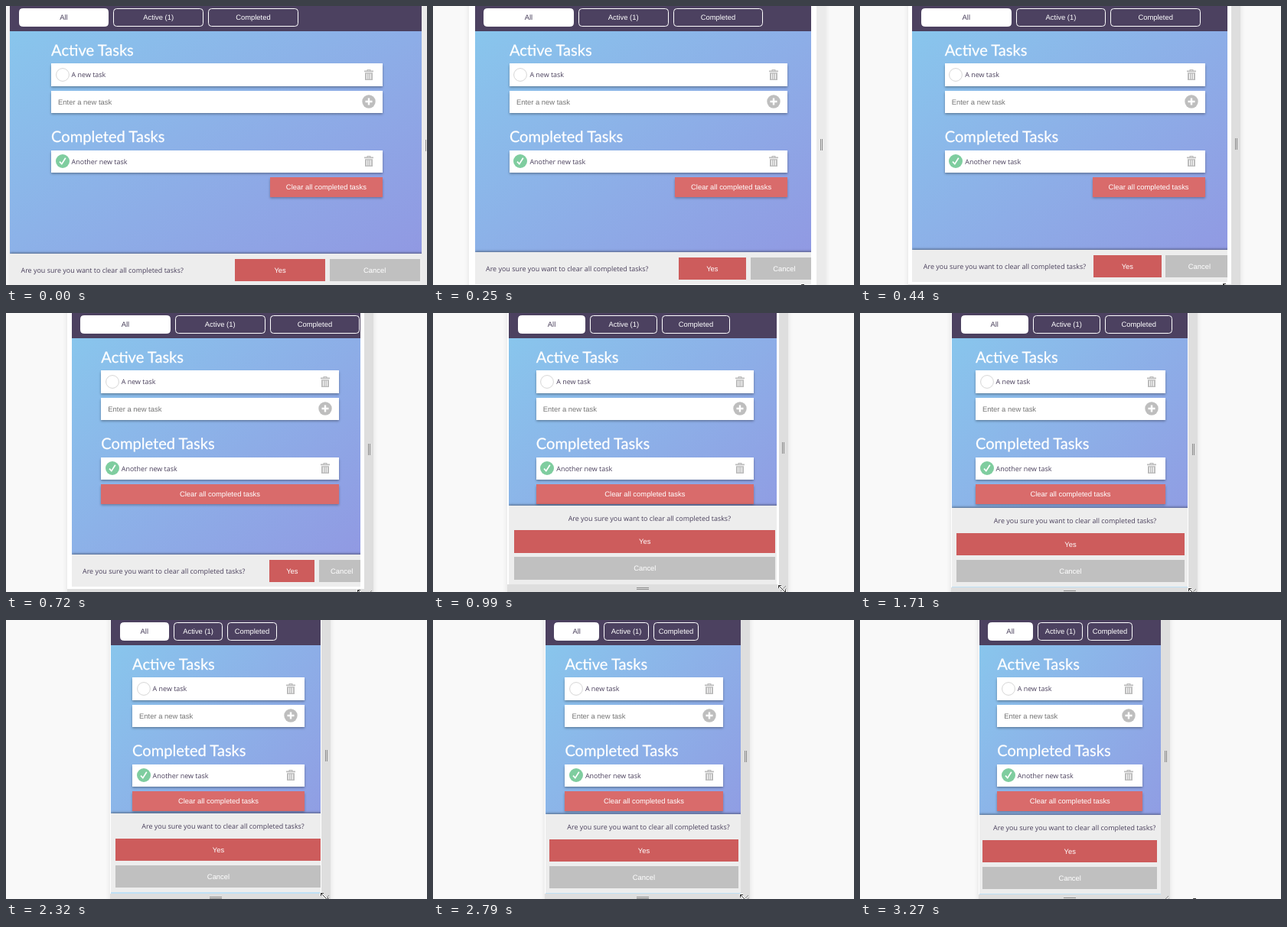
An HTML page for the animation above (3.3 s loop, 550 by 365 pixels).

```html
<!DOCTYPE html>
<html lang="en">
<head>
<meta charset="utf-8">
<title>Responsive task list</title>
<style>
  html, body { margin: 0; width: 100%; height: 100%; overflow: hidden; background: #f9f9f9; }
  #stage {
    position: relative; width: 550px; height: 365px; overflow: hidden; background: #f9f9f9;
    font: 9.42px "Liberation Sans", Arial, sans-serif; text-rendering: geometricPrecision;
    --ink: #4a405c; --cut: calc(548px - 2 * var(--outer));
  }
  #stage div, #stage svg { position: absolute; box-sizing: border-box; white-space: nowrap; }

  /* device frame with its drag bars */
  .frame {
    left: var(--outer); top: -20px; width: calc(var(--cut) + 12px); height: calc(var(--foot) + 32px);
    background: var(--bar); box-shadow: 0 0 7px rgba(0, 0, 0, .1);
  }
  .paper { left: var(--outer); top: 0; width: var(--cut); height: var(--foot); background: #fff; }
  .grip { border: solid #8b8b8b; }
  .grip.side {
    left: calc(552.5px - var(--outer)); top: calc(var(--bottom) / 2 - 8px);
    width: 3px; height: 15px; border-width: 0 1px;
  }
  .grip.base { left: 266px; top: calc(var(--foot) + 4px); width: 16px; height: 3px; border-width: 1px 0; }
  .corner { left: calc(549.5px - var(--outer)); top: calc(var(--foot) + 1px); width: 9px; height: 9px; }
  .cursor { left: calc(var(--cx) - 6px); top: calc(var(--cy) - 6px); width: 12px; height: 12px; }

  /* page: the layout width trails behind the clipped width */
  .page {
    left: var(--left); top: 0; width: calc(548.2px - 2 * var(--left)); height: var(--foot); overflow: hidden;
  }
  .gap { left: 0; top: 300px; width: 100%; bottom: 0; background: var(--gap); }
  .view { left: 0; top: 0; width: var(--width); height: var(--bottom); overflow: hidden; }
  .sky { inset: 0 0 20px 0; background: linear-gradient(to bottom right, #88c8ed, #9197e2); }
  .head { left: 0; top: 0; width: 100%; height: 32.5px; background: #4c4160; }
  .tab {
    top: 3px; left: calc(11.6px + var(--i) * (var(--tab) + 5.9px)); width: var(--tab); height: 24px;
    border: 1px solid #fff; border-radius: 4.5px; color: #fff; line-height: 22px; text-align: center;
  }
  .tab.on { background: #fff; color: var(--ink); }
  .body { left: 10%; top: 0; width: 80%; height: 100%; }
  .title {
    left: 0; height: 24px; line-height: 24px; color: #fff;
    font-family: Lato, sans-serif; font-size: 20.1px; -webkit-text-stroke: .25px #fff;
  }
  .card {
    left: 0; width: 100%; height: 29.5px; line-height: 29.5px;
    background: #fff; box-shadow: 0 1.5px 3px rgba(0, 0, 0, .35);
  }
  .task, .ask { font-family: "Open Sans", "Noto Sans", sans-serif; font-size: 8.95px; color: var(--ink); }
  .task { left: 26.5px; top: 0; }
  .hint { left: 9px; top: 0; color: #757575; }
  .dot { left: 5.5px; top: 5.5px; width: 18px; height: 18px; }
  .icon { right: 9px; top: 5.5px; width: 18px; height: 18px; }
  .clear {
    right: 0; top: 224px; width: var(--clear); height: 26.3px; line-height: 26.3px;
    background: #d96b6b; color: #fff; text-align: center; box-shadow: 0 1.5px 3px rgba(0, 0, 0, .3);
  }

  .dialog {
    left: 0; bottom: 0; width: 100%; height: 42.5px; background: #ededed;
    box-shadow: 0 -1px 3px rgba(0, 0, 0, .45);
  }
  .ask { left: 14.5px; bottom: 10px; height: 20px; line-height: 20px; }
  .btn {
    bottom: 6px; width: var(--btn); height: 29.3px; line-height: 29.3px; color: #fff; text-align: center;
  }
  .yes { right: calc(11.2px + var(--btn)); background: #cd5c5c; }
  .no { right: 5.4px; background: #c0c0c0; }
  .stacked .dialog { height: 103px; }
  .stacked .ask { left: 6px; width: 100%; bottom: 76px; text-align: center; }
  .stacked .btn { left: 2%; width: 96%; right: auto; }
  .stacked .yes { bottom: 41px; }
</style>
</head>
<body>
<svg width="0" height="0" style="position:absolute">
  <symbol id="open" viewBox="0 0 18 18"><circle cx="9" cy="9" r="8.4" fill="#fff" stroke="#d6d6d6"/></symbol>
  <symbol id="done" viewBox="0 0 18 18">
    <circle cx="9" cy="9" r="9" fill="#7fcd9f"/>
    <path d="M5 9.6 7.8 12.6 12.8 4.8" fill="none" stroke="#fff" stroke-width="1.7"/>
  </symbol>
  <symbol id="bin" viewBox="0 0 18 18">
    <path d="M3 3.6h12v1.7H3zM6.5 2h5v1.6h-1.2v-.5H7.7v.5H6.500z M4 6.200h10V16H4z" fill="#bcbcbc"/>
    <path d="M6.500 7.600v7M9 7.600v7M11.500 7.600v7" stroke="#fff"/>
  </symbol>
  <symbol id="plus" viewBox="0 0 18 18">
    <circle cx="9" cy="9" r="8.700" fill="#bebebe"/>
    <path d="M9 4.500v9M4.500 9h9" stroke="#fff" stroke-width="2.400"/>
  </symbol>
</svg>

<div id="stage">
  <div class="frame"></div>
  <div class="paper"></div>
  <div class="page">
    <div class="gap"></div>
    <div class="view">
      <div class="sky"></div>
      <div class="head">
        <div class="tab on" style="--i:0">All</div>
        <div class="tab" style="--i:1">Active (1)</div>
        <div class="tab" style="--i:2">Completed</div>
      </div>
      <div class="body">
        <div class="title" style="top:46px">Active Tasks</div>
        <div class="card" style="top:75px">
          <svg class="dot"><use href="#open"/></svg>
          <div class="task">A new task</div>
          <svg class="icon"><use href="#bin"/></svg>
        </div>
        <div class="card" style="top:110.500px">
          <div class="hint">Enter a new task</div>
          <svg class="icon"><use href="#plus"/></svg>
        </div>
        <div class="title" style="top:159.200px">Completed Tasks</div>
        <div class="card" style="top:188.500px">
          <svg class="dot"><use href="#done"/></svg>
          <div class="task">Another new task</div>
          <svg class="icon"><use href="#bin"/></svg>
        </div>
        <div class="clear">Clear all completed tasks</div>
      </div>
      <div class="dialog">
        <div class="ask">Are you sure you want to clear all completed tasks?</div>
        <div class="btn yes">Yes</div>
        <div class="btn no">Cancel</div>
      </div>
    </div>
  </div>
  <div class="grip side"></div>
  <div class="grip base"></div>
  <svg class="corner" viewBox="0 0 9 9"><path d="M1 8 8 1M4.500 8.500 8.500 4.500" stroke="#8b8b8b"/></svg>
  <svg class="cursor" viewBox="0 0 12 12" fill="none">
    <path d="M1.500 5V1.500H5M1.500 1.500l9 9M7 10.500h3.500V7" stroke="#fff" stroke-width="2.400"/>
    <path d="M1.500 5V1.500H5M1.500 1.500l9 9M7 10.500h3.500V7" stroke="#333"/>
  </svg>
</div>

<script>
  const LOOP = 3300;
  const stage = document.getElementById('stage');
  const names = ['outer', 'left', 'width', 'bottom', 'foot', 'cx', 'cy'];

  // time, then one value for each name
  const poses = [
    [0,    5,    5,     541,   366,   368,   562, 372],
    [250,  47,   54.5,  454,   364,   367,   486, 369],
    [570,  75,   79,    402,   359.5, 362,   473, 368],
    [720,  80,   85.5,  388,   358,   361,   464, 367],
    [990,  96.5, 99.3,  355,   354.5, 355,   456, 361],
    [1140, 103,  104.5, 344,   355.5, 356.5, 449, 362],
    [1710, 119,  120,   310,   358,   358.5, 434, 365],
    [2320, 136,  137,   281,   356,   358,   416, 362],
    [2890, 149,  149.8, 250,   357.5, 358.5, 403, 364],
    [2990, 150.5, 151.3, 247,  358,   358.5, 440, 369],
    [3270, 155,  155.5, 237.5, 358,   358.5, 440, 369]
  ];

  // the window redraws in steps: first, last, count
  const runs = [
    [0, 250, 6], [290, 570, 7], [620, 770, 4], [814, 990, 5], [1040, 1140, 3],
    [1190, 1710, 12], [1800, 2320, 12], [2370, 2890, 12], [2990, 3270, 7]
  ];
  const ticks = runs.flatMap(([from, to, n]) =>
    Array.from({ length: n }, (_, i) => Math.round(from + (to - from) * i / (n - 1))));

  const set = (name, value) => stage.style.setProperty('--' + name, value);

  function poseAt(t) {
    const next = Math.max(1, poses.findIndex(p => p[0] >= t));
    const a = poses[next - 1], b = poses[next];
    const k = (t - a[0]) / (b[0] - a[0]);
    return names.map((_, i) => a[i + 1] + (b[i + 1] - a[i + 1]) * k);
  }

  function draw(time) {
    const t = ticks.findLast(tick => tick <= time);
    const pose = poseAt(t);
    const width = pose[2];
    const stacked = width < 377;
    pose.forEach((v, i) => set(names[i], v.toFixed(2) + 'px'));

    // breakpoints of the page
    set('tab', (width > 377 ? 117.8 : width > 294 ? 88.3 : width > 265 ? 64.4 : 59) + 'px');
    set('btn', (width > 471 ? 117.8 : width > 412 ? 88.3 : 59) + 'px');
    set('clear', width > 412 ? '147px' : '100%');
    set('gap', stacked ? '#bfe0f5' : '#fff');
    set('bar', t < 300 ? '#ebebeb' : '#dedede');
    stage.classList.toggle('stacked', stacked);
  }

  const start = performance.now();
  function loop() {
    draw((performance.now() - start) % LOOP);
    requestAnimationFrame(loop);
  }
  loop();
</script>
</body>
</html>
```
